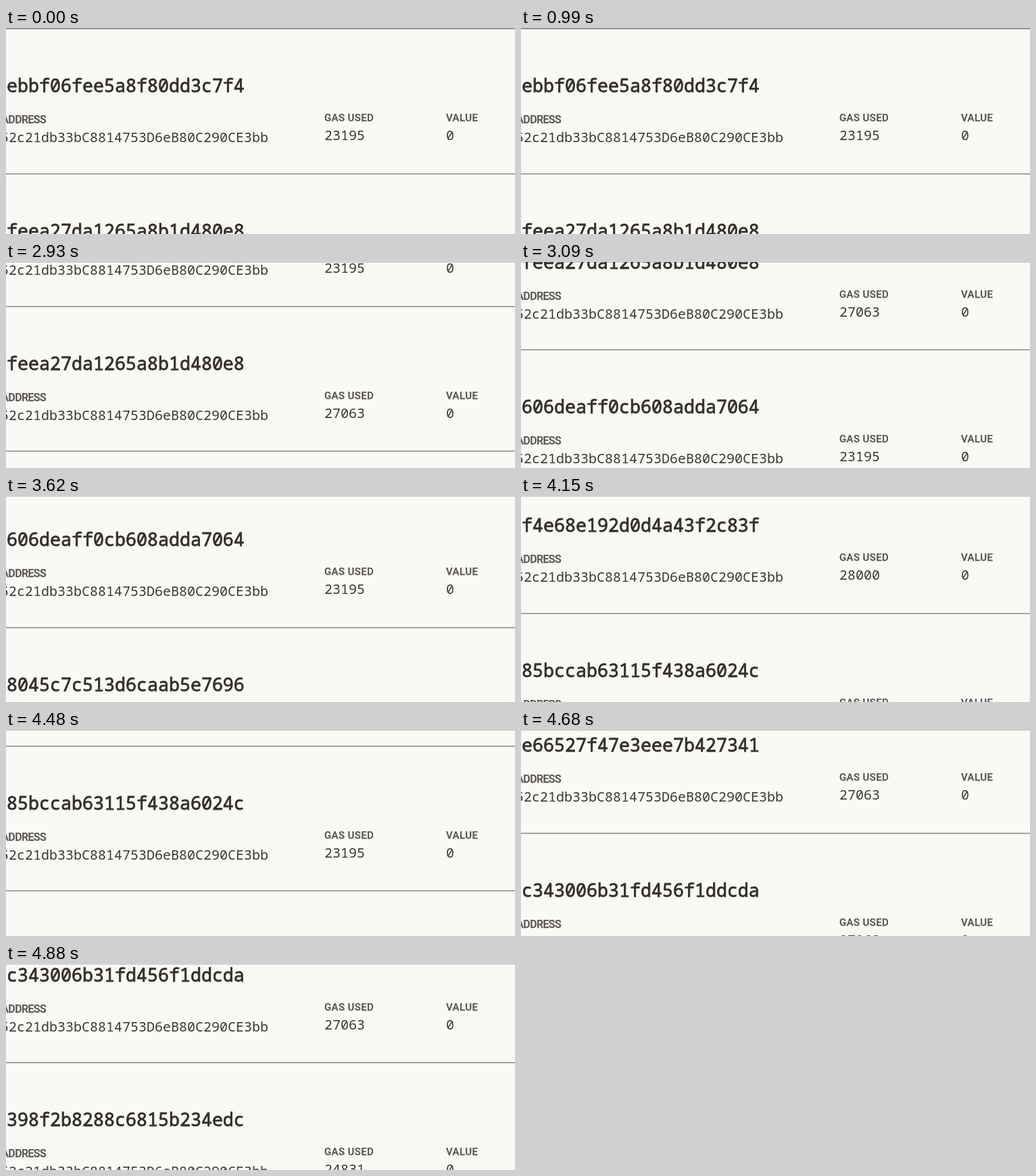
Recreate the animation shown at these times as an HTML page. Size 753 by 305 pixels, loop 7610 ms.

```html
<!DOCTYPE html>
<html lang="en">
<head>
<meta charset="utf-8">
<title>Transaction list</title>
<style>
  html, body { margin: 0; width: 100%; height: 100%; overflow: hidden; background: #faf9f5; }
  svg { display: block; width: 753px; height: 305px; }
  .hash, .data { font-family: "Noto Sans Mono", "DejaVu Sans Mono", monospace; white-space: pre; font-variant-ligatures: none; }
  .hash { font-size: 26.67px; font-weight: 500; fill: #332f2d; stroke: #332f2d; stroke-width: .8px; }
  .data { font-size: 20px; fill: #3b3836; }
  .label, .address { font-family: Roboto, "Open Sans", sans-serif; font-weight: 500; fill: #55514f; stroke: #55514f; stroke-width: .25px; }
  .label { font-size: 15px; letter-spacing: .4px; }
  .address { font-size: 16px; letter-spacing: -.6px; text-anchor: end; }
  .rule { fill: #a5a4a1; }
</style>
</head>
<body>
<svg viewBox="0 0 753 305">
  <g id="list"></g>
  <rect width="753" height="1" fill="#000" fill-opacity=".2"/>
  <g id="pointer" opacity="0">
    <path d="M348 219v29l6.6-6.2 4.4 10.4 5-2.1-4.4-10.1h9z"
      fill="#000" stroke="#fff" stroke-width="2" stroke-linejoin="round"/>
  </g>
</svg>
<script>
const LOOP = 7610;
const ROW_HEIGHT = 214.5;
const CONTRACT = '52c21db33bC8814753D6eB80C290CE3bb';

const transactions = [
  ['ebbf06fee5a8f80dd3c7f4', 23195],
  ['feea27da1265a8b1d480e8', 27063],
  ['606deaff0cb608adda7064', 23195],
  ['8045c7c513d6caab5e7696', 27063],
  ['f4e68e192d0d4a43f2c83f', 28000],
  ['85bccab63115f438a6024c', 23195],
  ['e66527f47e3eee7b427341', 27063],
  ['c343006b31fd456f1ddcda', 27063],
  ['398f2b8288c6815b234edc', 24831]
];

// Each wheel notch scrolls 150px, until the end of the list.
const NOTCH = 150, MAX_SCROLL = 1571;
const notchTimes = [0, 2930, 3090, 3620, 3820, 4020, 4150, 4480, 4580, 4680, 4810, 4880];

const text = (kind, x, y, value) => `<text class="${kind}" x="${x}" y="${y}">${value}</text>`;

const row = ([hash, gas], i) => `
  <g transform="translate(0 ${Math.round(i * ROW_HEIGHT)})">
    <rect class="rule" width="753" height="2"/>
    ${text('hash', 1, 95, hash)}
    ${text('address', 59, 141, 'ADDRESS')}
    ${text('data', -8, 169, CONTRACT)}
    ${text('label', 471, 138, 'GAS USED')}
    ${text('data', 471, 166, gas)}
    ${text('label', 651, 138, 'VALUE')}
    ${text('data', 651, 166, 0)}
  </g>`;

// Plays [time, value] pairs as hard steps, looping forever.
function playSteps(element, property, steps) {
  const frames = steps.map(([time, value]) =>
    ({ offset: time / LOOP, [property]: value, easing: 'steps(1, end)' }));
  frames.push({ offset: 1, [property]: steps.at(-1)[1] });
  element.animate(frames, { duration: LOOP, iterations: Infinity });
}

const list = document.getElementById('list');
list.innerHTML = transactions.map(row).join('');

playSteps(list, 'transform', notchTimes.map((time, i) =>
  [time, `translateY(${-Math.min(i * NOTCH, MAX_SCROLL)}px)`]));
playSteps(document.getElementById('pointer'), 'opacity', [[0, 0], [920, 1], [990, 0]]);
</script>
</body>
</html>
```
